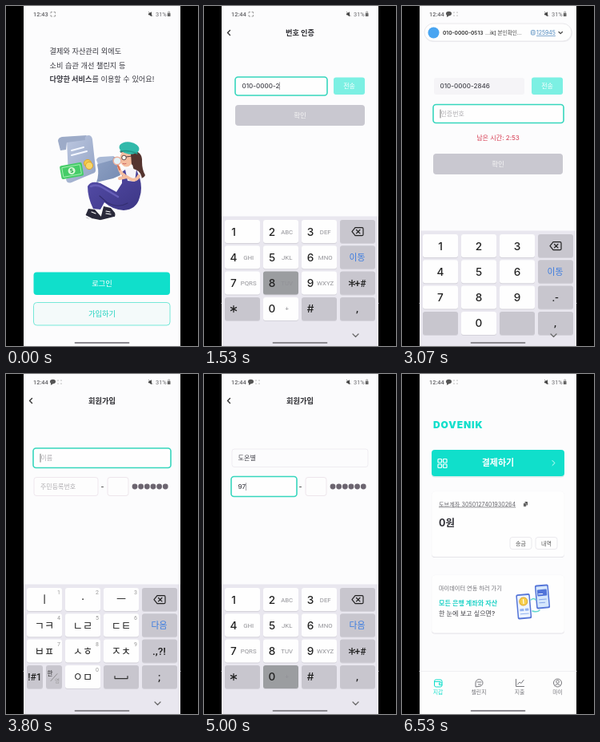
An HTML page that plays this animation: 240 by 426 pixels, repeating every 6.59 s.

```html
<!DOCTYPE html>
<html lang="ko">
<head>
<meta charset="utf-8">
<title>회원가입</title>
<style>
html, body { margin: 0; width: 100%; height: 100%; overflow: hidden; background: #000; }
svg { display: block; width: 100vw; height: 100vh; }
text { font-family: Inter, "Noto Sans CJK KR", "Noto Sans CJK", sans-serif; }
.sys { font-family: Roboto, "Noto Sans CJK KR", "Noto Sans CJK", sans-serif; }
</style>
</head>
<body>
<svg id="stage" viewBox="0 0 240 426"></svg>
<script>
const LOOP = 6590;
const TEAL = '#10dfcb', INK = '#3a3a42', HINT = '#b0aeb2', KEY = '#c8c6ce', DOWN = '#9b9da0';
const PHONE = '010-0000-2846', SENDER = '010-0000-0513', CODE = '125945', BIRTH = '970301';
const NAME = ['', 'ㄷ', '도', '도ㅇ', '도오', '도온', '도온ㅂ', '도온벼', '도온별'];
const NAME_KEYS = ['ㄷㅌ', 'ㅡ', 'ㅇㅁ', 'ㅡ', 'ㄴㄹ', 'ㅂㅍ', 'ㅣ', 'ㄴㄹ'];
const STEP = 75, PRESS = 60;

const box = (x, y, x2, y2, fill, r = 3, stroke = 'none', sw = 1) =>
  `<rect x="${x}" y="${y}" width="${x2 - x}" height="${y2 - y}" rx="${r}" fill="${fill}" stroke="${stroke}" stroke-width="${sw}"/>`;
const oval = (x, y, rx, ry, fill, tilt = 0) =>
  `<ellipse cx="${x}" cy="${y}" rx="${rx}" ry="${ry}" fill="${fill}" transform="rotate(${tilt} ${x} ${y})"/>`;
const dot = (x, y, r, fill, stroke = 'none', sw = 1) =>
  `<circle cx="${x}" cy="${y}" r="${r}" fill="${fill}" stroke="${stroke}" stroke-width="${sw}"/>`;
const shape = (d, fill) => `<path d="${d}" fill="${fill}"/>`;
const line = (d, color = '#555', w = 1) =>
  `<path d="${d}" fill="none" stroke="${color}" stroke-width="${w}" stroke-linecap="round" stroke-linejoin="round"/>`;
const tilted = (angle, x, y, parts) => `<g transform="rotate(${angle} ${x} ${y})">${parts}</g>`;
const fade = (id, from, to) =>
  `<linearGradient id="${id}" x2="1" y2="1"><stop stop-color="${from}"/><stop offset="1" stop-color="${to}"/></linearGradient>`;
// y is the middle of the line of text
const text = (s, x, y, size, fill = INK, extra = '') =>
  `<text x="${x}" y="${y + size * .36}" font-size="${size}" fill="${fill}" ${extra}>${s}</text>`;
const mid = (s, x, y, size, fill, extra = '') => text(s, x, y, size, fill, 'text-anchor="middle" ' + extra);
const BOLD = 'font-weight="700"', MEDIUM = 'font-weight="500"', SYS = 'class="sys"';

// Number of entries made by time t, and the entry being pressed right now
const typed = (t, start, n) => Math.max(0, Math.min(n, Math.floor((t - start) / STEP) + 1));
function pressed(t, start, keys) {
  const i = typed(t, start, keys.length);
  return i < keys.length && t >= start + i * STEP - PRESS ? keys[i] : '';
}

function status(t) {
  let s = text(t < 1400 ? '12:43' : '12:44', 34, 10, 7.4, '#626266', SYS + ' ' + MEDIUM);
  if (t >= 2600) {
    s += oval(58.5, 9.5, 3.5, 2.8, '#555') + shape('M56 11v3l3-2z', '#555');
    for (const x of [65, 69]) for (const y of [8, 12]) s += dot(x, y, .6, '#777');
  } else {
    s += line('M56 9v-1.5h1.5M60 7.5h1.5V9M61.5 11.5v1.5H60M57.5 13H56v-1.5', '#888', .8);
  }
  return s + shape('M178 9.2h1.2l2.8-2v6l-2.8-2H178z', '#444') + line('M178.5 7.5l4.5 5', '#444', .7)
    + text('31%', 187, 10, 7.4, '#6a6a6e', SYS) + box(201.8, 9, 205.5, 13, '#666', .6) + box(202.6, 7, 204.7, 9, 'none', .8, '#777', .7);
}

const header = title => line('M32.5 30.5l-3 3 3 3', '#333', 1.4) + mid(title, 120, 33.3, 9.2, '#2b2b30', BOLD);

function field(x, y, x2, y2, value, hint, focus, fill, stroke) {
  const cy = (y + y2) / 2, tx = x + 8;
  let s = focus ? box(x - 1, y - 1, x2 + 1, y2 + 1, '#fefefe', 3.5, '#36d6bd', 1.6) : box(x, y, x2, y2, fill, 3, stroke);
  if (value) s += text(value + (focus ? '<tspan dx="-1" font-weight="300">|</tspan>' : ''), tx - .5, cy, 8.1, '#46464e', MEDIUM);
  else s += text(hint, tx + (focus ? .5 : 0), cy, 8, HINT) + (focus ? line(`M${tx} ${cy - 5}v10`, '#555', .8) : '');
  return s;
}

// Keyboards
const COLS = [26, 74, 122];
const star = (x, y) => line(`M${x} ${y - 4}v8M${x - 3.5} ${y - 2}l7 4M${x - 3.5} ${y + 2}l7-4`, '#222', 1.3);
const backspace = y => line(`M189 ${y - 5}h8.5q1.5 0 1.5 1.5v7q0 1.5-1.5 1.5H189l-4-5zM190.5 ${y - 2.2}l4.4 4.4M194.9 ${y - 2.2}l-4.4 4.4`, '#222', 1.2);

function keyboard(kind, enter, hit = '') {
  const plain = kind === 'plain', dial = kind === 'dial', top = plain ? 286 : 268;
  const rowY = r => top + 32.3 * r;
  const c = r => rowY(r) + 14.7;
  const key = (x, r, fill, w = 44) => box(x, rowY(r) + 1, x + w, rowY(r) + 30, '#d4d2da') + box(x, rowY(r), x + w, rowY(r) + 29, fill);
  let s = box(22, top - 4.5, 218, 426, '#e9e7ef', 0);
  const side = ['', enter, plain ? '.-' : dial ? '' : '.,?!', kind === 'hangul' ? ';' : ','];
  side.forEach((label, r) => {
    s += key(170, r, KEY) + mid(label, 191.5, c(r), r === 1 ? 10.8 : 13.5, r === 1 ? '#3a7be0' : '#222', SYS + ' ' + MEDIUM);
  });
  s += backspace(c(0));
  if (dial) s += star(185, c(2)) + text('+#', 188.5, c(2), 12, '#222', SYS + ' ' + MEDIUM);

  if (kind === 'hangul') {
    ['ㅣ', '·', 'ㅡ', 'ㄱㅋ', 'ㄴㄹ', 'ㄷㅌ', 'ㅂㅍ', 'ㅅㅎ', 'ㅈㅊ', '', 'ㅇㅁ', ''].forEach((k, i) => {
      const x = COLS[i % 3], r = i / 3 | 0;
      if (k) {
        s += key(x, r, k === hit ? DOWN : '#fefefe') + mid(k, x + 22, c(r), 13.2, '#222', SYS + ' ' + MEDIUM)
          + mid((i + 1) % 11, x + 40, rowY(r) + 5.5, 7, '#999', SYS);
      } else if (i === 9) {
        s += key(26, 3, KEY, 20) + key(50, 3, KEY, 20) + mid('!#1', 36, c(3), 12, '#222', SYS + ' ' + MEDIUM)
          + text('한', 51.5, c(3) - 4, 7.5, '#222', SYS) + line(`M56 ${c(3) + 5}l8-9`, '#777', .7) + text('영', 61, c(3) + 5, 6.5, '#999', SYS);
      } else {
        s += key(x, r, KEY) + line(`M${x + 14} ${c(3) - 1}v3h16v-3`, '#333', 1.2);
      }
    });
  } else {
    const letters = ['', 'ABC', 'DEF', 'GHI', 'JKL', 'MNO', 'PQRS', 'TUV', 'WXYZ', '', '+'];
    [...'123456789*0#'].forEach((k, i) => {
      const x = COLS[i % 3], r = i / 3 | 0, fn = k === '*' || k === '#';
      s += key(x, r, k === hit ? DOWN : fn ? KEY : '#fefefe');
      if (plain) s += fn ? '' : mid(k, x + 22, c(r), 13.6, '#222', MEDIUM);
      else s += (k === '*' ? star(x + 11, c(r)) : mid(k, x + 11, c(r), 13.6, '#222', MEDIUM))
        + mid(letters[i] || '', x + 29.7, c(r), 7.8, '#929297', SYS);
    });
  }
  return s + line('M186 411l3.5 3.5 3.5-3.5', '#666', 1.2);
}

function tabs(active) {
  const col = i => i === active ? TEAL : '#77777c';
  const labels = ['지갑', '챌린지', '지출', '마이'].map((n, i) => mid(n, [45, 96, 147, 194.5][i], 399, 6.9, col(i))).join('');
  return box(22, 372, 218, 426, '#fdfdfd', 0) + line('M22 372.5H218', '#efeff2') + labels
    + box(40.5, 383, 50, 392, 'none', 2, col(0)) + line('M41 385.5h7M50 387h-3.5v2.5H50', col(0))
    + line('M92 391.5v-4.5a4.5 4.5 0 1 1 4.5 4.5zM94 386h5M95.5 389h3', col(1))
    + line('M142.5 382.5v9h10M144.5 389l2.5-3 2 1.5 3-4', col(2))
    + dot(194.5, 387, 5, 'none', col(3)) + dot(194.5, 385.5, 1.8, 'none', col(3)) + line('M191 390.5q3.5-4 7 0', col(3));
}

function bill() {
  return dot(101, 196.5, 4.5, '#e9b93a') + dot(104, 200, 5, '#f5cd55', '#dda52c')
    + shape('M76 168l27-6q4 0 5 5l4 37q1 5-4 6l-26 11q-6 2-7-4l3-4z', 'url(#paper)')
    + shape('M65 169q0-4 5-5l31-2q-3 2-2 6l-23 3-1 9-7 1z', '#9dabc8')
    + line('M82 181l15-4M82 187l19-5', '#f4f7ff', 2)
    + dot(102, 197, 4.6, '#f3c74c', '#dda52c') + dot(104, 200, 4.6, '#f8d668', '#dda52c')
    + tilted(-10, 82, 206, box(68, 198, 96, 215, '#45cc68', 2) + box(70.5, 200.5, 93.5, 212.5, 'none', 1, '#a4efb2')
      + dot(82, 206.5, 4.5, '#d8f8d8') + mid('$', 82, 206.5, 7, '#2fa851', BOLD));
}

function reader() {
  return shape('M157 181q14 1 13 14 0 10 4 17-4 7-11 1-7-13-6-32z', '#54342f')
    + oval(150.5, 191, 8, 10.5, '#f4bd9f')
    + shape('M143 184q9-4 13 1l1 14q4-1 6-7l-1-9-18-3z', '#54342f')
    + oval(154, 178, 12.5, 7.6, '#31b9aa', 8) + line('M143 182q11-2 21 3', '#239688', 1.5)
    + dot(147.5, 190, 2.8, '#fff8f0', '#473034', .9) + line('M150.5 189l7-1', '#473034', .9) + line('M146 197.5q2 1 4 0', '#c85c5c', .9)
    // shirt, overalls and legs
    + shape('M145 205q9-4 17 0 8 3 8 14l-8 5-16-5z', '#f5f3f8')
    + shape('M145 208l4-3 3 14 9 1 2-15 4 10q4 14 0 25-4 15-20 16-14-1-24-10l-5 9-9-1q-7-14-7-28 4-8 16-4l20 11 7-11z', 'url(#denim)')
    + line('M117 238l9 8q14 8 26 1', '#332e70', 1.2) + line('M106 226q7-3 14 1l20 12', '#675fb9', 2.5)
    // sheet, arms and lens
    + shape('M118 192l17-3q4 0 4 5l4 18-9 4-21 5q4-11 1-22z', 'url(#sheet)') + shape('M113 193q1-4 6-4l16-1-2 5-18 5z', '#a9b9d6')
    + line('M166 213q-4 9-15 1l-9 2', '#f4bd9f', 4) + line('M148 212q-5-2-7-10', '#f4bd9f', 3.6)
    + line('M140 200l2 5', '#d96c4f', 2) + dot(139, 194, 4.8, '#e5f3f8', '#ecb09c', 1.5)
    // shoes
    + shape('M103 254l8 1 8 9q2 4-3 5l-14-3q-4-2-2-5z', '#29293a') + line('M99 263l8 4 10 2', '#fff', 2)
    + shape('M122 251l9 2 5 6q2 5-3 7l-13 3q-3-2-1-6z', '#29293a') + line('M119 269l16-4', '#fff', 2)
    + line('M107 258l5 2M125 257l5 1M125 260l6 1', '#fff', 1.2);
}

function landing() {
  return '<defs>' + fade('paper', '#bcc7e0', '#93a3c4') + fade('sheet', '#8ea1c4', '#768bb2') + fade('denim', '#564eab', '#3c3684') + '</defs>'
    + text('결제와 자산관리 외에도', 54.5, 57, 9.2) + text('소비 습관 개선 챌린지 등', 54.5, 74.5, 9.2)
    + text(`<tspan ${BOLD}>다양한 서비스</tspan>를 이용할 수 있어요!`, 54.5, 92, 9.2) + bill() + reader()
    + box(34.5, 333.5, 205, 362, TEAL, 4) + mid('로그인', 120, 348, 9.3, '#fff')
    + box(34.5, 371.5, 205, 400, '#f4fafa', 4, '#76e8d8') + mid('가입하기', 120, 385.5, 9.3, '#22d3c0', MEDIUM);
}

function verify(t) {
  const sent = t >= 2050, n = typed(t, 965, 11), by = sent ? 185 : 124;
  const number = PHONE.slice(0, n + (n > 3) + (n > 7));
  const dial = t >= 600 && t < 1830, pad = t >= 2750 && t < 3570;
  let s = header('번호 인증')
    + field(40, 90, 153, 111, number, '전화번호', dial, '#f5f4f7', 'none')
    + box(162, 89.5, 201, 111, '#7cf0e3') + mid('전송', 181.5, 100, 8, '#fff', MEDIUM)
    + box(39, by, 201, by + 26, '#c9c8d0', 4) + mid('확인', 120, by + 13, 8.5, '#f5f5f5', MEDIUM);
  if (sent) {
    const left = 180 - Math.max(0, Math.floor((t - 2130) / 125));
    s += field(40, 124.5, 201, 145.5, CODE.slice(0, typed(t, 3140, 6)), '인증번호', pad, '#f5f4f7', 'none')
      + mid(`남은 시간: ${left / 60 | 0}:${String(left % 60).padStart(2, '0')}`, 120, 165, 8.1, '#d63a50');
  }
  s += tabs(-1);
  if (dial) s += keyboard('dial', '이동', pressed(t, 965, PHONE.replace(/-/g, '')));
  if (pad) s += keyboard('plain', '이동', pressed(t, 3140, CODE));
  if (t >= 2600 && t < 3400) {
    s += box(28, 23, 213, 45, '#eeeef1', 11) + box(28, 22, 212, 44, '#fefefe', 11, '#e4e3e6', .8)
      + dot(39.5, 33.5, 7, '#49a5f1')
      + text(SENDER, 51, 33.5, 6.6, '#333', 'font-weight="600"') + text('...ik] 본인확인...', 104, 33.5, 6.6, '#444', MEDIUM)
      + box(161.5, 30.5, 166, 36, 'none', 1, '#4a86bd', .8) + line('M163 32.5h1.5M163 34.2h1.5', '#4a86bd', .6)
      + text(CODE, 168, 33.5, 6.9, '#4a86bd', 'text-decoration="underline"') + line('M196 32.5l2.2 2.2 2.2-2.2', '#444', 1.2);
  }
  return s;
}

function signup(t) {
  const naming = t >= 3720 && t < 4740, birth = t >= 4740 && t < 5440, digit = t >= 5440 && t < 5720;
  let s = header('회원가입')
    + field(35, 94, 205, 116.5, NAME[typed(t, 3960, 8)], '이름', naming, '#fcfcfd', '#efedf1')
    + field(35, 129.5, 115, 152.5, BIRTH.slice(0, typed(t, 4900, 6)), '주민등록번호', birth, '#fdfdfd', '#efe7ee')
    + line('M119.5 141.5h2', '#555')
    + field(127, 129.5, 153, 152.5, t >= 5580 ? '1' : '', '', digit, '#fdfdfd', '#eee6ec');
  for (let i = 0; i < 6; i++) s += dot(161 + i * 7.65, 141, 3.4, '#6c6570');
  s += tabs(-1);
  if (naming) s += keyboard('hangul', '다음', pressed(t, 3960, NAME_KEYS));
  if (birth) s += keyboard('dial', '다음', pressed(t, 4900, BIRTH));
  if (digit) s += keyboard('dial', '다음', pressed(t, 5580, '1'));
  return s;
}

const card = (y, y2) => box(37, y + 1, 203, y2 + 1, '#dfdee3', 4) + box(37, y, 203, y2, '#fefefe', 4, '#f7f7f9', .6);

function phones() {
  return tilted(-5, 175, 279, box(167, 264, 184, 294, '#5575d8', 2) + box(168.5, 266, 182.5, 292, '#d6e7fc', 1)
      + box(169.5, 270, 181.5, 278, '#5274d9', 1) + line('M171 275.5h5', '#fff') + line('M171 282.5h9M171 286.5h7', '#86a6ea'))
    + tilted(-5, 152, 291, box(143.5, 275.5, 161, 307, '#5575d8', 2) + box(145, 277.5, 159.5, 305, '#eef5ff', 1)
      + dot(152.3, 285, 5, '#f6cf4c', '#dfaa30') + line('M152.3 282.5v5', '#fff', 1.2)
      + box(147, 294, 152, 297, '#92b3f0', .5) + box(153.5, 294, 158, 297, '#92b3f0', .5) + line('M147.5 300.5h10', '#92b3f0'))
    + line('M161 283q4-3 6 0M163 297q6 2 9-1', '#62d8d0', 1.5);
}

function home() {
  let s = text('DOVENIK', 39, 63.5, 12, TEAL, 'font-weight="900" letter-spacing=".9"')
    + box(37, 97, 203, 129.5, '#d5ece9', 4) + box(37, 95, 203, 128, TEAL, 4)
    + mid('결제하기', 120, 111.5, 11, '#fff', BOLD) + line('M188 108.5l3 3-3 3', '#d8fffa');
  for (const x of [45, 51.5]) for (const y of [106.5, 113]) s += box(x, y, x + 4.5, y + 4.5, 'none', .8, '#fff', 1.2);
  const small = (label, x) => box(x, 204.5, x + 27, 219.5, '#fefefe', 3, '#e6e5ea', .8) + mid(label, x + 13.5, 212, 7, '#555');
  return s + card(147, 229)
    + text('도브계좌 3050127401930264', 46, 163, 7.2, '#66666c', 'text-decoration="underline"')
    + box(153.5, 160, 157, 164.5, '#555', .7) + box(151.8, 161.7, 155.3, 166.2, '#555', .7, '#fefefe', .5)
    + text('0원', 46, 186, 12.5, '#33333a', BOLD) + small('송금', 135) + small('내역', 167)
    + card(252, 324.5) + text('마이데이터 연동 하러 가기', 46, 268.5, 7.2, '#707076')
    + text('모든 은행 계좌와 자산', 46, 287.5, 8.1, '#22d3c8', 'font-weight="600"')
    + text('한 눈에 보고 싶으면?', 46, 300.5, 8.1, '#44444a', MEDIUM)
    + phones() + tabs(0);
}

const stage = document.getElementById('stage');
let last = '';
function draw(t) {
  const page = t < 330 ? landing() : t < 3630 ? verify(t) : t < 6070 ? signup(t) : home();
  const view = box(0, 0, 240, 426, '#000', 0) + box(22, 0, 218, 426, '#fcfcfd', 0)
    + status(t) + page + line('M86.5 422h67', '#8a888e', 1.8);
  if (view !== last) stage.innerHTML = last = view;
}
const start = performance.now();
function tick() {
  draw((performance.now() - start) % LOOP);
  requestAnimationFrame(tick);
}
tick();
</script>
</body>
</html>
```
